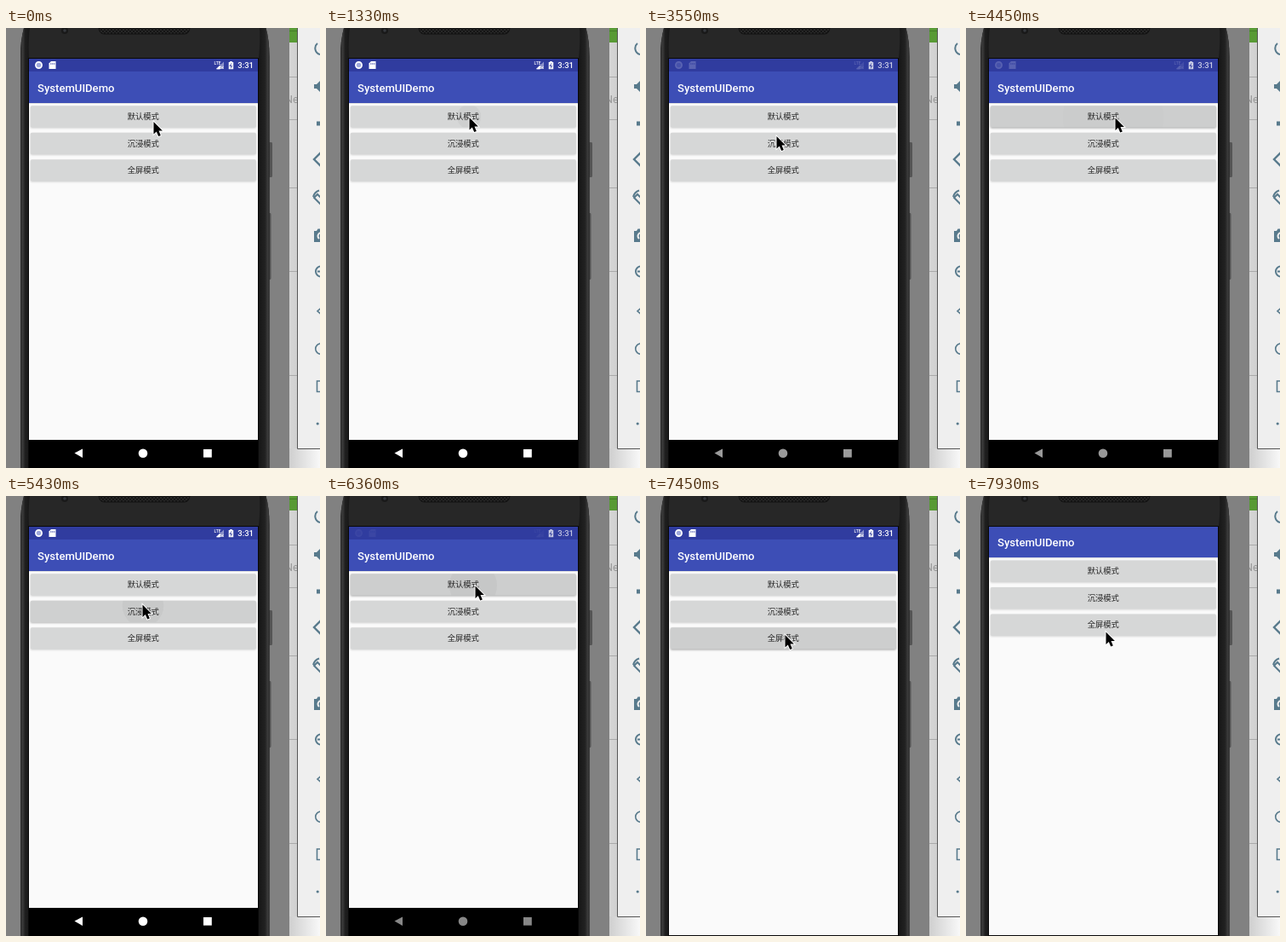
Recreate the animation shown at these times as an HTML page. Size 369 by 516 pixels, loop 8 s.

```html
<!DOCTYPE html>
<html lang="zh-CN">
<head>
<meta charset="utf-8">
<title>SystemUIDemo</title>
<style>
  html, body { margin: 0; width: 100%; height: 100%; overflow: hidden; background: #818181; }
  svg { display: block; width: 369px; height: 516px; }
  .ui { font-family: Roboto, sans-serif; font-weight: 500; fill: #fff; }
  .cjk { font: 500 9.3px "Noto Sans CJK SC", "Noto Sans CJK", sans-serif; fill: #252525; text-anchor: middle; }
</style>
</head>
<body>
<svg viewBox="0 0 369 516">
  <defs>
    <linearGradient id="side">
      <stop offset="0" stop-color="#d6d6d6"/><stop offset="1" stop-color="#bdbdbd"/>
    </linearGradient>
    <linearGradient id="floor" x2="1">
      <stop offset="0" stop-color="#cfcfcf"/><stop offset="1" stop-color="#f8f8f8"/>
    </linearGradient>
    <linearGradient id="rimL">
      <stop offset="0" stop-color="#2b2b2b"/><stop offset=".25" stop-color="#3a3a3a"/>
      <stop offset=".5" stop-color="#1f1f1f"/><stop offset="1" stop-color="#171717"/>
    </linearGradient>
    <linearGradient id="rimR">
      <stop offset="0" stop-color="#171717"/><stop offset=".6" stop-color="#222"/>
      <stop offset=".85" stop-color="#3c3c3c"/><stop offset="1" stop-color="#2a2a2a"/>
    </linearGradient>
    <pattern id="mesh" width="4" height="4" patternUnits="userSpaceOnUse">
      <rect width="4" height="4" fill="#151515"/>
      <path d="M0 0L4 4M4 0L0 4" stroke="#2c2c2c" stroke-width=".8"/>
    </pattern>
    <clipPath id="screen"><rect x="27" y="36" width="269" height="480"/></clipPath>
    <filter id="soft" x="-5%" y="-30%" width="110%" height="160%"><feGaussianBlur stdDeviation="1.1"/></filter>
  </defs>

  <!-- backdrop -->
  <rect x="333" width="36" height="516" fill="url(#side)"/>
  <rect x="333" y="493" width="36" height="23" fill="url(#floor)"/>
  <rect x="333" width="9" height="17" fill="#589a35"/>
  <path d="M333 3.5h9" stroke="#447c28"/>
  <path d="M333 57.5h9M333 107.5h9M333 187.5h9M333 285.5h9M333 407.5h9" stroke="#aaa"/>
  <text x="328" y="88" font-family="Roboto, sans-serif" font-size="12.500" fill="#979797">Ne</text>
  <rect width="333" height="516" fill="#818181"/>

  <!-- tool panel -->
  <path d="M342.500-1V493.500H370V-1Z" fill="#efefef" stroke="#565656"/>
  <g fill="none" stroke="#587a8c" stroke-width="2">
    <path d="M366 18a7.500 7.500 0 0 0 3 13"/>
    <path d="M362 66v5h3l4 4v-13l-4 4z" fill="#587a8c" stroke="none"/>
    <path d="M365 112h4" stroke-width="5"/>
    <path d="M370 146l-8 8 8 8" stroke-width="2.400"/>
    <path d="M362 199l4-4 9 9-4 4zM361 198a11 11 0 0 1 7-7.500"/>
    <path d="M362 238h3l1.500-2.500H370V251h-8z" fill="#587a8c" stroke="none"/>
    <path d="M370 240a4 4 0 0 0-2 7" stroke="#efefef"/>
    <path d="M370 279.500a6 6 0 0 0 0 12M366 285.500h4"/>
    <path d="M370 328.500l-4 3.500 4 3.500" stroke-width="1.600"/>
    <path d="M370 370a6.200 6.200 0 0 0 0 12.500" stroke-width="1.600"/>
    <path d="M370 414h-4.500v12.500h4.500" stroke-width="1.600"/>
    <circle cx="366.200" cy="464" r="1.600" fill="#587a8c" stroke="none"/>
  </g>

  <!-- phone -->
  <path d="M309 134h3q1 0 1 2v37q0 2-1 2h-3zM309 217h1.500q1 0 1 2v74q0 2-1 2H309z" fill="#555"/>
  <path d="M21 0Q17 14 17 34V516H309.500V34Q309.500 14 305.500 0Z" fill="#1d1d1d"/>
  <path d="M21 0Q17 14 17 34V516H27V34Q26 14 28 0Z" fill="url(#rimL)"/>
  <path d="M298 0Q299 14 297 34V516H309.500V34Q309.500 14 305.500 0Z" fill="url(#rimR)"/>
  <path d="M28 0Q26 14 27 36H297Q299 14 298 0Z" fill="#272727"/>
  <circle cx="69" cy="3" r="4" fill="#191919"/>
  <circle cx="69" cy="3" r="1.800" fill="#35383d"/>
  <path d="M109 0Q110 7 115 7H210Q215 7 216 0Z" fill="url(#mesh)" stroke="#111"/>
  <rect x="26" y="35" width="271" height="481" fill="#080808"/>

  <!-- screen -->
  <g clip-path="url(#screen)">
    <rect x="27" y="36" width="269" height="479" fill="#fafafa"/>
    <g id="app">
      <rect x="27" y="51" width="269" height="37" fill="#3d4eb6"/>
      <path d="M27 88.500h269" stroke="#e2e2e2"/>
      <text class="ui" x="37" y="74.800" font-size="13.100">SystemUIDemo</text>
      <g id="list"></g>
    </g>
    <g id="status">
      <rect x="27" y="36" width="269" height="15" fill="#303c9f"/>
      <g id="notes">
        <circle cx="38.500" cy="43.500" r="3.600" fill="#9fa8da" stroke="#fff" stroke-width="1.700"/>
        <path d="M53 39h5.500v9H50.500V41.500z" fill="#fff"/>
        <path d="M52.800 41v2M54.800 41v2M56.800 41v2" stroke="#303c9f" stroke-width=".7"/>
        <text class="ui" x="244.500" y="43.200" font-size="5">LTE</text>
        <path d="M256 39.500V48H247.500z" fill="#fff" fill-opacity=".45"/>
        <path d="M251.500 44V48H247.500zM252.500 45l3 3M255.500 45l-3 3" fill="#fff" stroke="#fff" stroke-width=".8"/>
      </g>
      <g id="clock">
        <path d="M263.200 39h2.500v1h1.500v8.300h-5.500V40h1.500z" fill="#fff"/>
        <path d="M265 41.500l-2 3h2.600l-1.600 2.700" fill="none" stroke="#303c9f" stroke-width=".9"/>
        <text class="ui" x="272.300" y="47.200" font-size="9.500">3:31</text>
      </g>
    </g>
    <g id="nav">
      <rect x="27" y="483" width="269" height="33"/>
      <g id="keys" fill="#fff">
        <path d="M80.500 498.500L90 493.500v10.500z"/>
        <circle cx="161" cy="498.700" r="5.300"/>
        <rect x="232" y="494" width="9.800" height="9.600"/>
      </g>
    </g>
  </g>

  <path id="cursor" d="M0 0V14.500L3.300 11.500 5.700 17 8.300 15.900 6 10.500H10.400Z" stroke="#fff" stroke-width="1.800" paint-order="stroke"/>
</svg>
<script>
const LOOP = 8000;
const el = id => document.getElementById(id);
const clamp = v => Math.max(0, Math.min(1, v));
const fade = (t, a, b) => clamp((t - a) / (b - a));

// [time, x, y]
const path = [
  [60, 173.5, 110], [350, 168.5, 105], [2250, 168.5, 105], [2370, 157.5, 125.5], [2500, 151.5, 130],
  [2660, 153.5, 127], [3560, 153.5, 127], [3640, 179, 113], [3850, 175.5, 105.5], [4790, 175.5, 105.5],
  [5020, 160.5, 127.5], [5900, 160.5, 127.5], [6000, 175.5, 105.5], [6690, 175.5, 105.5],
  [6760, 162, 180], [7100, 163.5, 163], [7750, 163.5, 163], [7930, 164.5, 159.5]
];
// [button, x, y, press, release]
const taps = [
  [0, 168, 104, 1330, 1800], [1, 153, 128, 2920, 3150], [0, 173, 105, 4270, 4400],
  [1, 161, 129, 5390, 5650], [0, 173, 105, 6305, 6500], [2, 163, 164, 7340, 7370]
];

const buttons = ['默认模式', '沉浸模式', '全屏模式'].map((label, i) => {
  const y = 91.3 + i * 31.5;
  const box = `x="28.800" y="${y}" width="265" height="25.200" rx="1.5"`;
  el('list').insertAdjacentHTML('beforeend', `
    <clipPath id="clip${i}"><rect ${box}/></clipPath>
    <rect ${box} id="lift${i}" transform="translate(0 1)" filter="url(#soft)"/>
    <rect ${box} fill="#d6d7d7"/>
    <rect ${box} id="tint${i}"/>
    <circle id="wave${i}" clip-path="url(#clip${i})"/>
    <text class="cjk" x="161.300" y="${y + 15.9}">${label}</text>`);
  return { lift: el('lift' + i), tint: el('tint' + i), wave: el('wave' + i) };
});

function cursorAt(t) {
  const n = path.findIndex(p => p[0] > t);
  if (n === 0) return path[0].slice(1);
  if (n < 0) return path[path.length - 1].slice(1);
  const [a, b] = [path[n - 1], path[n]];
  const k = fade(t, a[0], b[0]);
  return [a[1] + (b[1] - a[1]) * k, a[2] + (b[2] - a[2]) * k];
}

function drawButton(b, i, t) {
  const tap = taps.find(p => p[0] === i && t >= p[3] && t < p[4] + 280);
  let tint = 0, wave = 0;
  if (tap) {
    const [, x, y, down, up] = tap;
    tint = fade(t, down, down + 60) * (1 - fade(t, up + 100, up + 280));
    wave = 1 - fade(t, up, up + 80);
    b.wave.setAttribute('cx', x);
    b.wave.setAttribute('cy', y);
    b.wave.setAttribute('r', 14 + 0.25 * (t - down));
  }
  b.lift.setAttribute('opacity', 0.16 + 0.16 * tint);
  b.tint.setAttribute('opacity', 0.045 * tint);
  b.wave.setAttribute('opacity', 0.035 * wave);
}

function draw(t) {
  const dim = fade(t, 3300, 3600) - fade(t, 4420, 4630) +
              fade(t, 5700, 6090) - fade(t, 6510, 6750);
  const full = t >= 7930;
  const hide = fade(t, 7560, 7750);
  buttons.forEach((b, i) => drawButton(b, i, t));
  el('notes').setAttribute('opacity', (1 - 0.95 * dim) * (1 - hide));
  el('clock').setAttribute('opacity', (1 - 0.3 * dim) * (1 - hide));
  el('keys').setAttribute('opacity', 1 - 0.47 * dim);
  el('nav').setAttribute('display', t >= 7430 ? 'none' : 'inline');
  el('status').setAttribute('display', full ? 'none' : 'inline');
  el('app').setAttribute('transform', `translate(0 ${full ? -15.7 : 0})`);
  el('cursor').setAttribute('transform', `translate(${cursorAt(t).join(' ')})`);
}

const start = performance.now();
function tick() {
  draw((performance.now() - start) % LOOP);
  requestAnimationFrame(tick);
}
tick();
</script>
</body>
</html>
```
